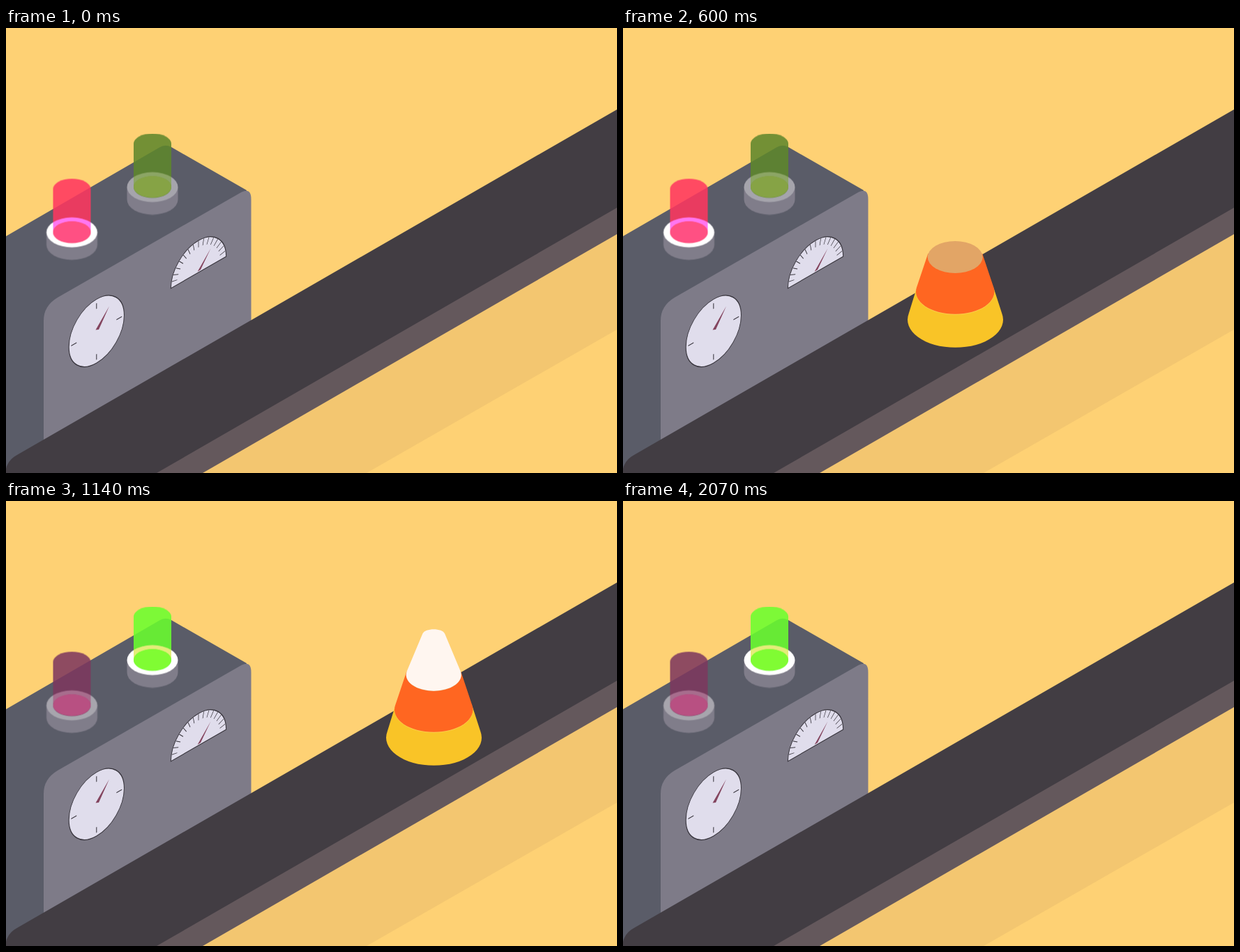
An HTML page that plays this animation: 876x639 px, repeating every 2100 ms.

```html
<!DOCTYPE html>
<html lang="en">
<head>
<meta charset="utf-8">
<title>Candy conveyor</title>
<style>
  html, body { margin: 0; width: 100%; height: 100%; overflow: hidden; background: #fed174; }
  svg { display: block; width: 876px; height: 639px; }

  /* The small negative delay keeps step edges clear of frame times. */
  .anim { animation: 2100ms -2ms infinite linear; }

  .red { --tube: #ff3760; --ring: #fff; --back: #ff76f1; --glow: #ff5083; }
  .red.off { --tube: #7e385f; --ring: #a7a5ad; --back: #a76d8d; --glow: #b85082; }
  .green { --tube: #6aff2f; --ring: #fff; --back: #e4ec79; --glow: #80fc33; }
  .green.off { --tube: #5f872c; --ring: #a5a4ac; --back: #8ca565; --glow: #86a345; }

  .stop { animation-name: stop; animation-timing-function: step-end; }
  .go { animation-name: go; animation-timing-function: step-end; }
  @keyframes stop { 0% { opacity: 1 } 42.857%, 100% { opacity: 0 } }
  @keyframes go { 0% { opacity: 0 } 42.857%, 100% { opacity: 1 } }

  .candy { animation-name: ride; }
  .base { animation-name: drop1; }
  .middle { animation-name: drop2; }
  .tip { animation-name: drop3; }
  @keyframes ride {
    0% { transform: none }
    42.857% { transform: none; animation-timing-function: steps(40) }
    100% { transform: translate(684.7px, -395.2px) }
  }
  @keyframes drop1 {
    0% { transform: translateY(-500px); animation-timing-function: steps(9) }
    12.857%, 100% { transform: none }
  }
  @keyframes drop2 {
    0% { transform: translateY(-500px) }
    14.286% { transform: translateY(-500px); animation-timing-function: steps(9) }
    27.143%, 100% { transform: none }
  }
  @keyframes drop3 {
    0% { transform: translateY(-500px) }
    28.571% { transform: translateY(-500px); animation-timing-function: steps(9) }
    41.429%, 100% { transform: none }
  }
</style>
</head>
<body>
<svg viewBox="0 0 876 639">
  <defs>
    <g id="lamp">
      <path fill="#807d8a" d="M-36.5 0V18A36.5 21.5 0 0 0 36.5 18V0Z"/>
      <ellipse rx="36.5" ry="21.5" style="fill:var(--ring)"/>
      <path style="fill:var(--tube)" opacity=".87" d="M-27 -62.5A27 14.5 0 0 1 27 -62.5V0A27 15.5 0 0 1 -27 0Z"/>
      <path style="fill:var(--back)" d="M-27 0V-14.4A36.5 21.5 0 0 1 27 -14.4V0A27 15.5 0 0 0 -27 0Z"/>
      <ellipse cy="-.5" rx="27" ry="15.5" style="fill:var(--glow)"/>
    </g>
  </defs>

  <rect width="876" height="639" fill="#fed174"/>

  <!-- machine -->
  <path fill="#5a5c68" d="M0 299L220 171.5Q228 166.5 237 171L345 233L300 500L60 639H0Z"/>
  <path fill="#7e7b88" d="M54 600V420Q54 399 74 387L338 235.500Q351.500 229 351.500 246V440Z"/>

  <g fill="#e0ddec" stroke="#37343c" stroke-width="1.2">
    <g transform="matrix(.866 -.5 0 1 129.800 435.300)">
      <circle r="45.800"/>
      <path d="M0 -40V-32M0 33V41M-42 0H-33M33 0H42"/>
    </g>
    <g transform="matrix(.866 -.5 0 1 276 351)">
      <path d="M-45.800 0A45.800 45.800 0 0 1 45.800 0Z"/>
      <g id="ticks" stroke-width=".9"></g>
    </g>
  </g>
  <path fill="#84455f" d="M148 399.500L133 433L128.500 433.500ZM293.500 316.500L279 347L274.500 350Z"/>

  <g transform="translate(94.500 293.500)">
    <use href="#lamp" class="anim red stop"/>
    <use href="#lamp" class="anim red off go"/>
  </g>
  <g transform="translate(210 228.500)">
    <use href="#lamp" class="anim green off stop"/>
    <use href="#lamp" class="anim green go"/>
  </g>

  <!-- conveyor -->
  <path fill="#f3c670" d="M876 290V433L517 639H270Z"/>
  <path fill="#64585c" d="M876 250V296L282 639H200Z"/>
  <path fill="#423d43" d="M876 117V258L216 639H0V633Q3 620 16 613Z"/>

  <g class="anim candy">
    <g class="anim base">
      <path fill="#f9c427" d="M420.500 375L409.700 410A68.500 40 0 1 0 543.300 410L532 375Z"/>
      <ellipse cx="476.200" cy="379.700" rx="56.200" ry="32.300" fill="#fbca49"/>
    </g>
    <g class="anim middle">
      <path fill="#ff6621" d="M437.300 324L421 372.500A56.200 32.300 0 1 0 531.400 372.500L515.200 324Z"/>
      <ellipse cx="476.200" cy="329" rx="39.500" ry="23" fill="#e2a566"/>
    </g>
    <g class="anim tip">
      <path fill="#fff6f0" d="M460.300 269.500L437.700 323.500A39.500 23 0 1 0 514.700 323.500L492.100 269.500C489 261 463.500 261 460.300 269.500Z"/>
    </g>
  </g>
</svg>
<script>
  const ticks = document.getElementById('ticks');
  const count = 16;
  let d = '';
  for (let i = 1; i < count; i++) {
    const a = Math.PI * i / count;
    const at = r => `${-r * Math.cos(a)} ${-r * Math.sin(a)}`;
    d += `M${at(36)}L${at(45)}`;
  }
  ticks.innerHTML = `<path d="${d}"/>`;
</script>
</body>
</html>
```
